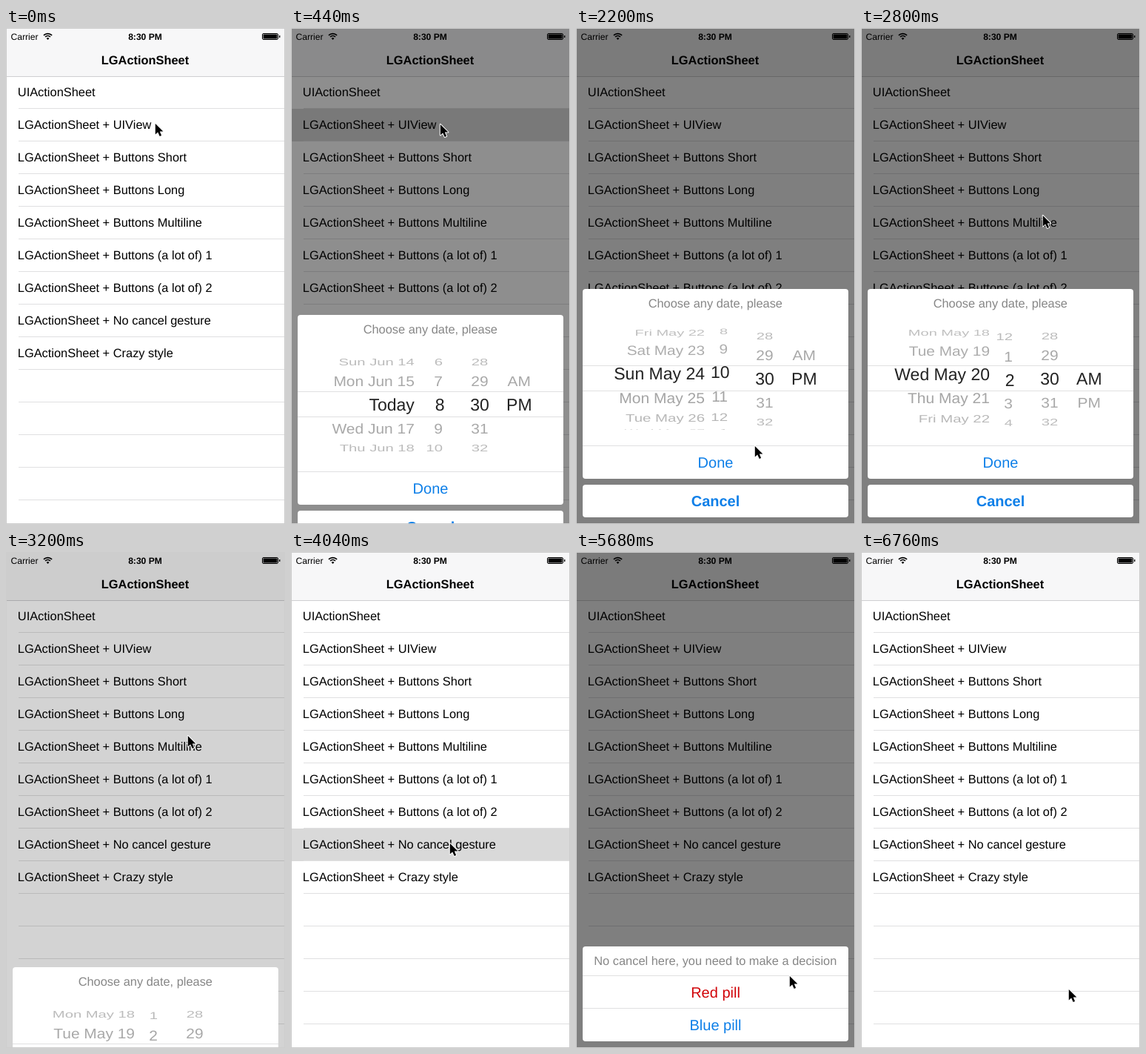
These frames come from a looping animation (377 px wide and 669 px high, 6800 ms). An HTML page:

```html
<!DOCTYPE html>
<html lang="en">
<head>
<meta charset="utf-8">
<title>Action sheet demo</title>
<style>
  html, body { margin: 0; width: 100%; height: 100%; overflow: hidden; background: #fff; }
  svg { display: block; width: 377px; height: 669px; }
  text { font-family: "Liberation Sans", Arial, sans-serif; font-size: 16.4px; text-rendering: geometricPrecision; white-space: pre; }
  .mid { text-anchor: middle; }
  .end { text-anchor: end; }
  .bold { font-weight: 700; }
  .status { font-size: 12.1px; }
  .button { font-size: 20px; fill: #0d7fe8; }
  .red { fill: #d10308; }
  .caption { fill: #868686; }
  .line { fill: #e0e0e1; }
  .grey text { fill: #969696; }
  .dark text { fill: #222; }
</style>
</head>
<body>
<svg viewBox="0 0 377 669">
  <defs>
    <clipPath id="band"><rect x="9" y="104" width="359" height="33"/></clipPath>
    <clipPath id="outside">
      <rect x="9" y="51" width="359" height="52"/>
      <rect x="9" y="138" width="359" height="52"/>
    </clipPath>
  </defs>
  <rect width="377" height="669" fill="#fff"/>
  <rect id="highlight" x="1" width="375" height="44" fill="#d9d9d9"/>
  <g id="list"></g>
  <g id="bar">
    <rect width="377" height="65" fill="#f7f7f8"/>
    <rect y="65" width="377" height="1" fill="#cfcfd1"/>
    <text class="status" x="6.5" y="15.5">Carrier</text>
    <text class="status bold mid" x="188" y="15.7">8:30 PM</text>
    <text class="bold mid" x="188" y="49">LGActionSheet</text>
    <g fill="none" stroke="#000" stroke-width="1.7">
      <path d="M50.9 9.9A8 8 0 0 1 62.1 9.9M53 12A5 5 0 0 1 60 12"/>
    </g>
    <path d="M56.5 16L54.6 14A2.7 2.7 0 0 1 58.4 14Z"/>
    <rect x="346.5" y="7.5" width="21" height="8" rx="1.5" fill="none" stroke="#000"/>
    <rect x="347.6" y="8.6" width="18.8" height="5.8" rx=".6"/>
    <rect x="369" y="10" width="1.4" height="3" rx=".6"/>
  </g>
  <rect id="dim" width="377" height="669"/>

  <g id="dateSheet">
    <rect x="9" width="359" height="256" rx="4" fill="#fff"/>
    <text class="caption mid" x="188.3" y="25.4">Choose any date, please</text>
    <rect class="line" x="9" y="103" width="359" height="1"/>
    <rect class="line" x="9" y="137" width="359" height="1"/>
    <g class="grey" clip-path="url(#outside)"></g>
    <g class="dark" clip-path="url(#band)"></g>
    <rect class="line" x="9" y="211" width="359" height="1"/>
    <text class="button mid" x="188.5" y="241">Done</text>
    <rect x="9" y="264" width="359" height="44" rx="4" fill="#fff"/>
    <text class="button bold mid" x="188.5" y="293">Cancel</text>
  </g>

  <g id="pillSheet">
    <rect x="9" width="359" height="128" rx="4" fill="#fff"/>
    <text class="caption mid" x="188.3" y="25.4">No cancel here, you need to make a decision</text>
    <rect class="line" x="9" y="39" width="359" height="1"/>
    <text class="button red mid" x="188.5" y="69">Red pill</text>
    <rect class="line" x="9" y="83" width="359" height="1"/>
    <text class="button mid" x="188.5" y="113">Blue pill</text>
  </g>

  <path id="cursor" d="M0 0V14.6L3.4 11.5 5.9 17 8.3 16 6 10.6H10.6Z" stroke="#fff" stroke-width="2" stroke-linejoin="round" paint-order="stroke"/>
  <rect x=".5" y=".5" width="376" height="668" fill="none" stroke="#cdcdcd"/>
</svg>
<script>
const LOOP = 6800, STEP = 40, ROW = 44, SLICE = 25 * Math.PI / 180, RADIUS = 75.7;
const $ = selector => document.querySelector(selector);

function add(parent, tag, attrs, content = '') {
  const el = document.createElementNS('http://www.w3.org/2000/svg', tag);
  for (const name in attrs) el.setAttribute(name, attrs[name]);
  el.textContent = content;
  parent.append(el);
  return el;
}

const titles = ['UIActionSheet', ...['UIView', 'Buttons Short', 'Buttons Long', 'Buttons Multiline',
  'Buttons (a lot of) 1', 'Buttons (a lot of) 2', 'No cancel gesture', 'Crazy style'
].map(name => 'LGActionSheet + ' + name)];
titles.forEach((title, i) => add($('#list'), 'text', { x: 15.8, y: 92.4 + i * ROW }, title));
for (let i = 0; i < 13; i++) add($('#list'), 'rect', { class: 'line', x: 17, y: 108 + i * ROW, width: 359, height: 1 });

// Timing helpers
const clamp = p => Math.max(0, Math.min(1, p));
const progress = (t, from, to) => clamp((t - from) / (to - from));
const decay = (t, from, to, power) => 1 - (1 - progress(t, from, to)) ** power;
const smooth = p => p * p * (3 - 2 * p);
function spring(t, start) {
  if (t <= start) return 0;
  if (t >= start + 500) return 1;
  const x = (t - start) * 0.0184;
  return 1 - (1 + x) * Math.exp(-x);
}

// Picker columns: label by index, position by time
function dateLabel(n) {
  if (n === 0) return 'Today';
  const [week, day, month] = new Date(Date.UTC(2015, 5, 16 + n)).toUTCString().split(/,? /);
  return `${week} ${month} ${+day}`;
}
const columns = [
  { anchor: 'end', x: label => label.includes('May') ? 174 : 166.8, label: dateLabel,
    at: t => -27 * decay(t, 1160, 3000, 2.23) },
  { anchor: 'end', x: (label, dark) => dark ? 207.5 : 205, label: n => String((n + 11) % 12 + 1),
    at: t => 8 + 7 * decay(t, 1960, 3400, 2.16) },
  { anchor: 'mid', x: () => 255, label: String, at: () => 30 },
  { anchor: 'mid', x: () => 308.3, label: n => ['AM', 'PM'][n] || '',
    at: t => 1 - smooth(progress(t, 2430, 2750)) }
];
for (const col of columns) {
  col.rows = [];
  for (let k = -3; k <= 3; k++) for (const layer of ['grey', 'dark'])
    col.rows.push({ k, dark: layer === 'dark', el: add($('.' + layer), 'text', { class: col.anchor }) });
}

function drawPicker(t) {
  for (const col of columns) {
    const pos = col.at(t), nearest = Math.round(pos);
    for (const { k, dark, el } of col.rows) {
      const offset = nearest + k - pos, angle = offset * SLICE, squash = Math.max(0, Math.cos(angle));
      const label = col.label(nearest + k);
      const size = dark ? 23 : 21.2 * (0.87 + 0.13 * squash);
      if (el.textContent !== label) el.textContent = label;
      el.style.fontSize = size + 'px';
      el.setAttribute('y', size * 0.358);
      el.setAttribute('transform',
        `translate(${col.x(label, dark)} ${121 + RADIUS * Math.sin(angle)}) scale(1 ${squash})`);
      if (!dark) el.setAttribute('opacity', clamp(1 - 0.18 * Math.abs(offset)));
    }
  }
}

// Pointer path: time, x, y
const path = [
  [0, 201, 128], [400, 201, 129], [720, 201, 129], [1000, 130, 445], [1160, 132, 525],
  [1500, 165, 520], [1880, 202, 515], [2020, 206, 470], [2200, 241, 563], [2300, 241, 560],
  [2840, 245, 247], [3660, 245, 247], [4000, 214, 392], [5080, 214, 392],
  [5680, 288, 571], [5800, 281, 588], [5920, 281, 588], [5960, 280, 589], [LOOP, 280, 589]
];
function pointer(t) {
  const i = path.findIndex(point => point[0] > t);
  const [t0, x0, y0] = path[i - 1], [t1, x1, y1] = path[i];
  const p = smooth(progress(t, t0, t1));
  return [x0 + (x1 - x0) * p, y0 + (y1 - y0) * p];
}

const sheets = [
  { el: $('#dateSheet'), top: 352, show: 236, hide: 3078 },
  { el: $('#pillSheet'), top: 532, show: 4200, hide: 6250 }
];
const taps = [
  { row: 1, on: 80, fade: 436, off: 736 },
  { row: 7, on: 4040, fade: 4400, off: 4700 }
];

function render(t) {
  let shade = 0;
  for (const { el, top, show, hide } of sheets) {
    const shown = spring(t, show) - spring(t, hide);
    el.setAttribute('transform', `translate(0 ${Math.round(669 - (669 - top) * shown)})`);
    shade += shown / 2;
  }
  $('#dim').setAttribute('opacity', shade);

  const tap = taps.find(({ on, off }) => t >= on && t < off);
  $('#highlight').setAttribute('opacity', tap ? 1 - progress(t, tap.fade, tap.off) : 0);
  if (tap) $('#highlight').setAttribute('y', 65 + tap.row * ROW);

  drawPicker(t);
  const [x, y] = pointer(t);
  $('#cursor').setAttribute('transform', `translate(${x + 0.8} ${y + 1})`);
}

let start;
function tick(now) {
  start ??= now;
  render(Math.floor((now - start) % LOOP / STEP) * STEP);
  requestAnimationFrame(tick);
}
render(0);
requestAnimationFrame(tick);
</script>
</body>
</html>
```
